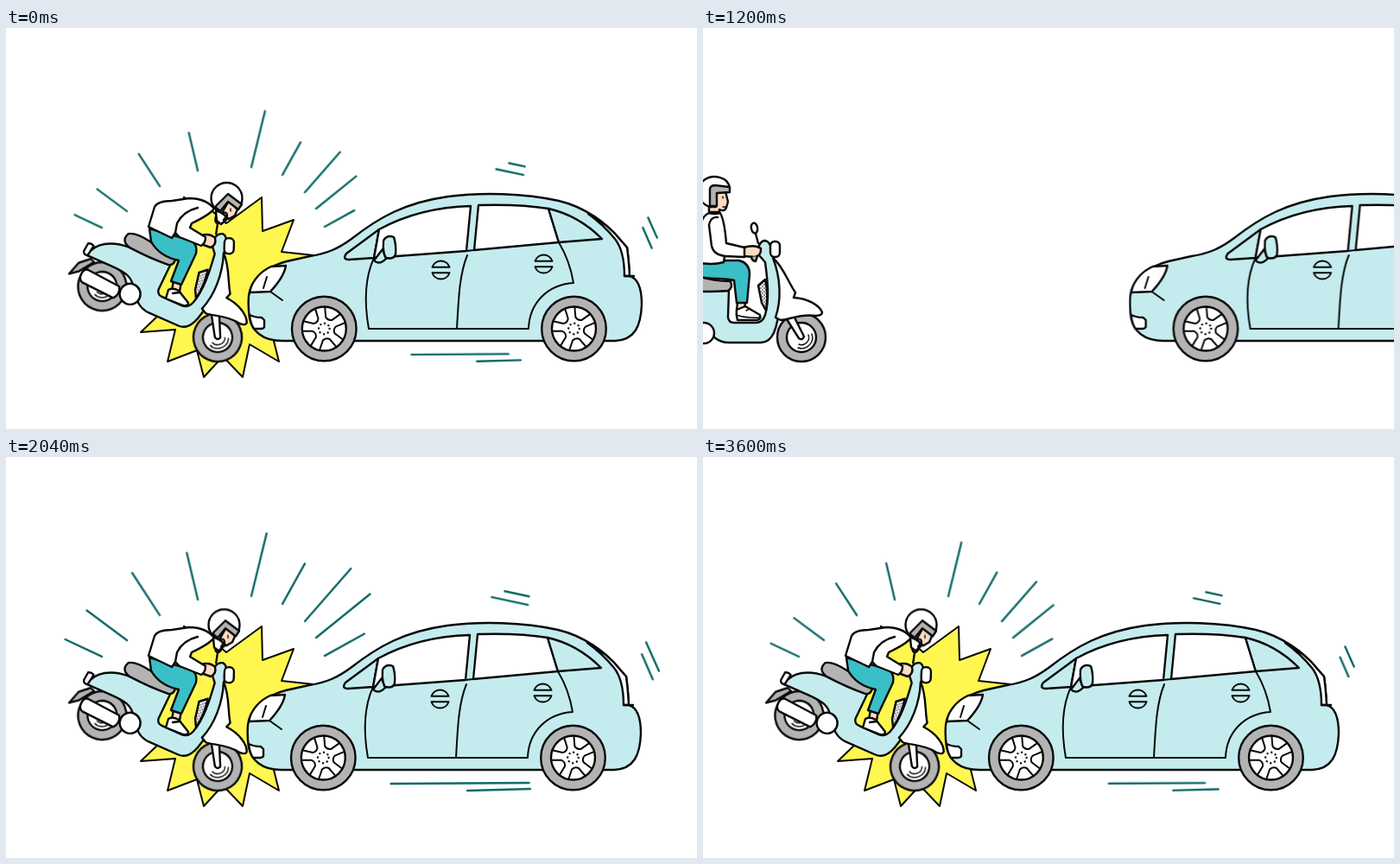
An HTML page without scripts for the animation above (3.64 s loop, 800 by 464 pixels).

```html
<!DOCTYPE html>
<html lang="en">
<head>
<meta charset="utf-8">
<title>Scooter and car collision</title>
<style>
html, body { margin: 0; width: 100%; height: 100%; overflow: hidden; background: #fff; }
svg { display: block; width: 800px; height: 464px; }
.ink { stroke: #080808; stroke-width: 2.4; stroke-linecap: round; stroke-linejoin: round; }
.blue { fill: #c4ecee; }
.white { fill: #fff; }
.grey { fill: #b3b3b3; }
.teal { fill: #3bbfc6; }
.skin { fill: #fddcc3; }
.yellow { fill: #fff64f; }
.none { fill: none; }
.thin { stroke-width: 1.4; }

.car, .ride, .crash { animation: 3.64s linear infinite; }
.car { animation-name: drive; }
.ride { animation-name: ride; }
.crash { animation-name: crash; }
@keyframes drive {
  0%, 13.73% { transform: none; }
  13.74% { transform: translateX(531px); }
  15.385% { transform: translateX(503.5px); }
  32.967% { transform: translateX(214px); }
  41.758% { transform: translateX(79px); }
  46.7%, 60% { transform: translateX(-1px); }
  75%, 100% { transform: none; }
}
@keyframes ride {
  0%, 13.73% { visibility: hidden; transform: translateX(-262px); }
  13.74% { visibility: visible; transform: translateX(-262px); }
  46.7% { visibility: visible; transform: translateX(46px); }
  46.71%, 100% { visibility: hidden; transform: translateX(46px); }
}
@keyframes crash {
  0%, 13.73% { visibility: visible; }
  13.74%, 46.7% { visibility: hidden; }
  46.71%, 100% { visibility: visible; }
}

.burst { transform-origin: 256px 300px; animation: pop 3.64s ease-out infinite; }
@keyframes pop {
  0%, 46.7% { transform: scale(1); }
  46.71% { transform: scale(.7); }
  49.4% { transform: scale(1.12); }
  52.5%, 100% { transform: scale(1); }
}

.lines path {
  fill: none; stroke: #0b6865; stroke-width: 2.4; stroke-linecap: round;
  vector-effect: non-scaling-stroke;
  transform-origin: var(--o);
  animation: pulse 3.64s cubic-bezier(.37, 0, .63, 1) calc(var(--d) - 3115ms) infinite;
}
@keyframes pulse {
  0%, 29.67%, 47.25%, 64.84%, 82.42%, 100% { transform: scale(var(--min, .74)); }
  38.46%, 56.04%, 73.63%, 91.21% { transform: scale(1); }
}
.speed path { --min: .69; transform-box: fill-box; transform-origin: center; }

.head { animation: nod 3.64s step-end var(--d) infinite; }
@keyframes nod {
  0%, 13.187%, 26.374%, 39.56%, 52.747%, 65.934%, 100% { transform: none; }
  6.593%, 19.78%, 32.967%, 46.154%, 59.34% { transform: var(--up); }
}
</style>
</head>
<body>
<svg viewBox="0 0 800 464" xmlns="http://www.w3.org/2000/svg">
<defs>
  <path id="spoke" d="M-10 -23.5L-4 -13Q0 -10 4 -13L10 -23.5" class="none" stroke-width="2"/>
  <g id="carWheel">
    <circle r="37.3" class="grey"/>
    <circle r="25.5" class="white"/>
    <use href="#spoke" transform="rotate(25)"/>
    <use href="#spoke" transform="rotate(97)"/>
    <use href="#spoke" transform="rotate(169)"/>
    <use href="#spoke" transform="rotate(241)"/>
    <use href="#spoke" transform="rotate(313)"/>
    <circle r="6.3" class="none" stroke-dasharray="0 4.95"/>
  </g>
  <path id="handle" d="M-10 -3.2A10.5 10.5 0 0 1 10 -3.2ZM-10 3.2A10.5 10.5 0 0 0 10 3.2Z" class="blue" stroke-width="2"/>
  <g id="scooterWheel">
    <circle r="28" class="grey"/>
    <circle r="17" class="white"/>
    <path d="M12 -4A12.5 12.5 0 0 1 -4 12M8 -3A8.5 8.5 0 0 1 -3 8" class="none thin"/>
  </g>
  <pattern id="dots" width="4" height="4" patternUnits="userSpaceOnUse">
    <rect width="4" height="4" fill="#fff"/>
    <circle cx="1" cy="1" r=".8"/><circle cx="3" cy="3" r=".8"/>
  </pattern>
  <rect id="lamp" x="160" y="247" width="11" height="18" rx="5" class="white"/>

  <g id="scooter">
    <path d="M25 334L14 344L9 360L18 353L30 336Z" class="grey"/>
    <use href="#scooterWheel" x="50" y="358"/>
    <use href="#scooterWheel" x="196" y="358"/>
    <path d="M179 337L193 359Q197 362 199 357L187 333Z" class="white"/>
    <path d="M146 249L143 238" class="none"/>
    <ellipse cx="141.5" cy="231.5" rx="3.6" ry="6" transform="rotate(-10 141.5 231.5)" class="white"/>
    <path d="M19 332C22 315 39 305 60 304H112L111 335Q112 341 118 341H143Q151 341 154 332C159 314 157 293 154 271L147 263Q144 249 153 246Q161 246 163 264C172 287 173 305 171 320C168 348 163 364 149 364H112C96 364 90 352 84 345C77 334 68 332 50 332Z" class="blue"/>
    <path d="M15 319Q18 317 22 319L20 332Q15 333 14 329Z" class="white"/>
    <path d="M146 298L154 291Q158 308 155 327L150 318Z" fill="url(#dots)"/>
    <path d="M163 266C175 276 181 295 189 306L187 312C204 313 217 321 220 329Q220 333 212 333C195 330 181 338 172 338L166 335C173 315 172 289 163 266Z" class="white"/>
    <path d="M53 290Q48 301 61 304Q88 306 111 304Q117 301 114 293Q93 293 80 288Q60 285 53 290Z" class="grey"/>
    <circle cx="83" cy="353" r="12" class="white"/>
    <path d="M27 347L68 350Q73 358 67 365L27 363Q22 362 22 355Q22 348 27 347Z" class="white"/>
  </g>
</defs>

<g class="crash">
  <g class="lines">
    <path d="M111 231L68.5 211" style="--o:111px 231px;--d:135ms"/>
    <path d="M140 212L93.5 177.5" style="--o:140px 212px;--d:105ms"/>
    <path d="M178 183L145.7 133.5" style="--o:178px 183px;--d:70ms"/>
    <path d="M222 165L208.8 108.8" style="--o:222px 165px;--d:35ms"/>
    <path d="M284 161L303 83" style="--o:284px 161px;--d:0ms;--min:.765"/>
    <path d="M320 170L347 121.5" style="--o:320px 170px;--d:35ms"/>
    <path d="M346 190L400 128.3" style="--o:346px 190px;--d:70ms"/>
    <path d="M359 209L421.5 158.5" style="--o:359px 209px;--d:105ms"/>
    <path d="M369 230L415 204.5" style="--o:369px 230px;--d:140ms"/>
  </g>
  <g class="lines speed">
    <path d="M561.5 162L605 171.2" style="--d:45ms"/>
    <path d="M577.5 155.3L605.5 161.3" style="--d:95ms;--min:.65"/>
    <path d="M735.7 227.3L749.3 258.5" style="--d:15ms"/>
    <path d="M741 214.3L756 247.7" style="--d:85ms"/>
    <path d="M445 378L606 377" style="--d:85ms"/>
    <path d="M534 386L607 384" style="--d:135ms"/>
  </g>
  <g class="ink">
    <path class="burst yellow" stroke-width="2" d="M296 196L297 235L333 222L319 259L356 263L322 285L345 315L309 358L316 386L282 366L274 404L251 380L229 404L221 373L187 386L196 349L156 352L181 328L172 300L188 270L200 235L225 200L255 226Z"/>
    <g transform="translate(49 0) rotate(23.8 196 358)">
      <use href="#scooter"/>
      <use href="#lamp" transform="rotate(-22 165 256)"/>
    </g>
    <path d="M194 292L192 304L201 305L203 293Z" class="skin"/>
    <path d="M188 303Q193 300 200 304L211 318Q211 322 205 321L185 313Z" class="white"/>
    <path d="M193 307L201 306" class="none"/>
    <path d="M166 232Q185 238 205 243Q223 246 220 261L203 297L191 293L200 269Q177 264 168 247Z" class="teal"/>
    <path d="M226 240Q236 237 242 243Q244 251 237 254L226 250Z" class="skin"/>
    <path d="M206 196L210 199" class="none"/>
    <path d="M165 230L172 207Q176 200 192 200L212 197Q231 197 241 209Q236 216 215 226L213 231L231 242Q231 249 226 252L201 242L196 237L192 243Z" class="white"/>
    <path d="M196 237L198 226Q205 212 222 208" class="none"/>
    <g class="head" style="--d:-1940ms;--up:translate(-3px,-2.7px)">
      <path d="M243 212L244 223L249 227L256 221L254 212Z" class="white"/>
      <circle cx="255.5" cy="197" r="18" class="white"/>
      <path d="M258 200L268 210L265 217L258 221L250 214Z" class="skin"/>
      <path d="M242 207L257 192L273 204L269 210L257 201L248 212Z" class="grey"/>
      <path d="M250 214Q256 212 256 217L252 222" class="none"/>
      <path d="M260 209V212" class="none thin"/>
    </g>
  </g>
</g>

<g class="ride ink">
  <use href="#scooter"/>
  <use href="#lamp"/>
  <path d="M122 317L121 327H130L131 317Z" class="skin"/>
  <path d="M121 326L131 322L148 332Q150 338 143 338H122Q120 332 121 326Z" class="white"/>
  <path d="M121 332Q132 336 148 335M132 327L136 325" class="none thin"/>
  <path d="M76 273L106 269H124Q136 272 136 285L133 318H121L118 292C105 289 89 291 79 288Q75 282 76 273Z" class="teal"/>
  <path d="M129 254Q142 250 149 255Q150 263 142 265L129 264Z" class="skin"/>
  <path d="M138 265Q139 270 143 270L145 264" class="grey"/>
  <g class="head" style="--d:-2820ms;--up:translate(-1px,-2px)">
    <path d="M90 205V215H102V212Q108 215 110 210L112 203L109 191H95Z" class="skin"/>
    <path d="M91 209C76 204 74 187 83 179C94 170 113 174 114 188L98 190V209Z" class="white"/>
    <path d="M91 208V188Q92 184 97 184L114 186V192L99 193V208Z" class="grey"/>
    <path d="M106 197V199M106 209H109" class="none thin"/>
  </g>
  <path d="M89 214Q95 216 102 214Q107 223 109 249L130 254V265L107 264L106 271Q92 275 75 271C76 254 78 237 80 226Q82 217 89 214Z" class="white"/>
  <path d="M107 264Q94 262 92 252L89 228Q91 218 99 219" class="none"/>
</g>

<g class="car ink">
  <path class="blue" d="M281 310C283 292 301 276 325 270L352 264C372 261 385 255 400 244C432 219 462 202 512 195C550 190 600 191 640 200C670 207 696 226 712 246L719 254Q721 268 722 287C733 290 736 305 736 320C735 345 728 361 705 362H320C296 362 285 350 282 336Q280 323 281 310Z"/>
  <path class="white" d="M674 215Q697 227 712 246L719 254Q721 268 722 287H716Q716 258 705 244Q691 227 674 215Z"/>
  <path class="none" d="M716 287H727"/>
  <path class="blue" d="M432 233L394 261Q389 268 397 268L426 266Z"/>
  <path class="white" d="M432 233C465 215 500 207 538 206L533 258L426 266Z"/>
  <path class="white" d="M547 205C580 204 610 206 628 209L640 248L542 257Z"/>
  <path class="blue" d="M628 209C655 215 674 228 690 244L640 248Z"/>
  <path class="none" stroke-width="2" d="M533 258L542 257M426 266C415 290 415 320 420 348H605C606 318 627 297 657 295Q653 270 640 248M534 263C525 285 524 312 522 348"/>
  <use href="#handle" x="503.5" y="280"/>
  <use href="#handle" x="622.5" y="273"/>
  <path class="blue" d="M436 256L426 269Q432 275 440 267Z"/>
  <path class="blue" d="M437 246Q441 239 449 242Q452 251 451 262Q449 268 440 266Q436 261 437 246Z"/>
  <path class="white" d="M282 306C285 291 296 281 307 276L324 275Q322 288 306 305Z"/>
  <path class="none" stroke-width="2" d="M302 288L298 301M306 305L320 315"/>
  <path class="white" d="M282 332Q288 335 296 335L299 338V346Q298 348 295 348H287Q283 342 282 332Z"/>
  <use href="#carWheel" x="368.3" y="348"/>
  <use href="#carWheel" x="657.5" y="348"/>
</g>
</svg>
</body>
</html>
```
